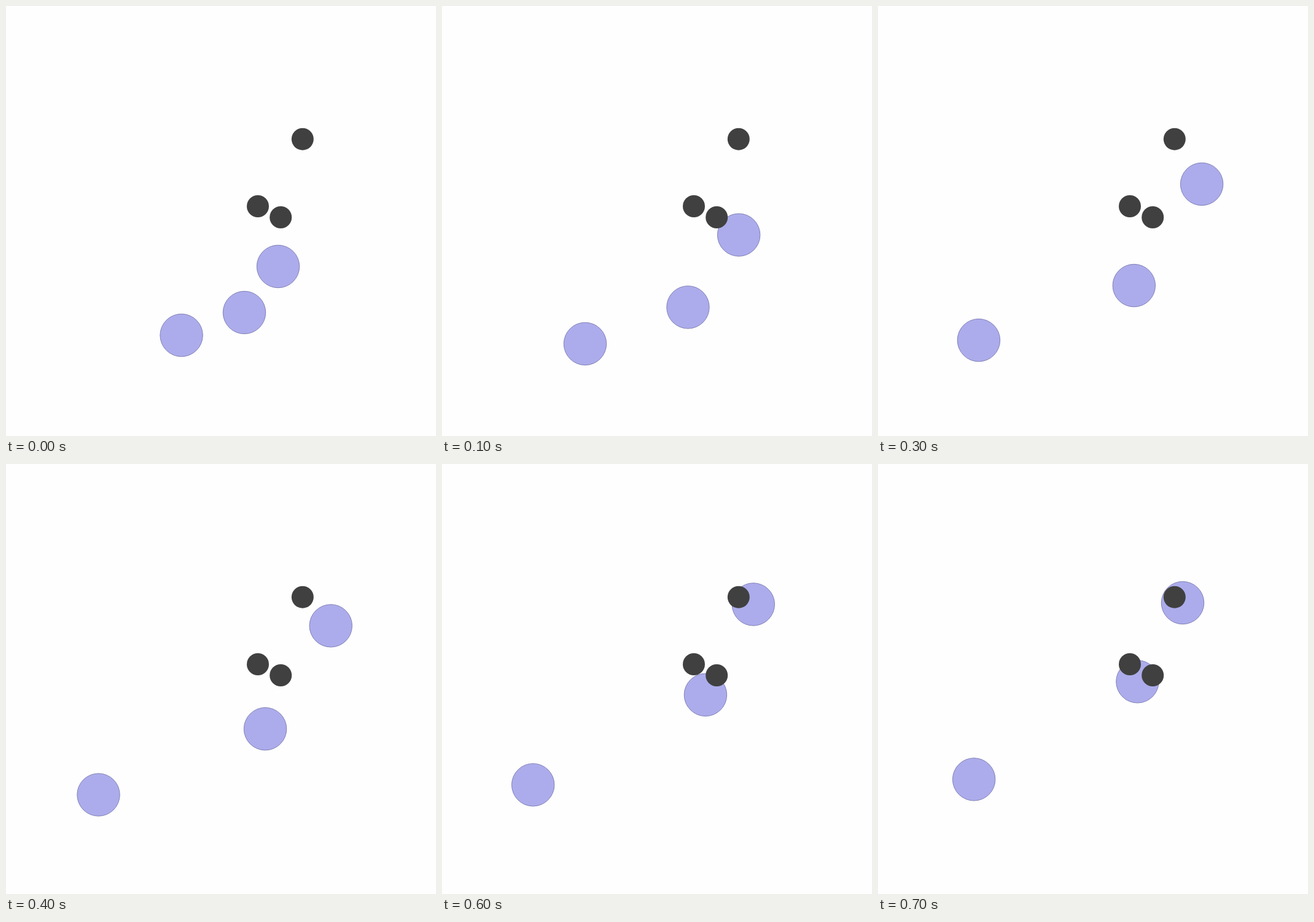
Recreate the animation shown at these times as an HTML page. Size 700 px wide and 700 px high, loop 800 ms.

```html
<!DOCTYPE html>
<html lang="en">
<head>
<meta charset="utf-8">
<title>Steered discs</title>
<style>
  html, body { margin: 0; width: 100%; height: 100%; overflow: hidden; background: #fefefe; }
  svg { display: block; width: 100%; height: 100%; }
  .disc { fill: #acacec; stroke: #8080b8; stroke-width: 1; }
  .dot { fill: #404040; }
</style>
</head>
<body>
<svg viewBox="0 0 700 700"></svg>
<script>
const STEP = 100;
const STEPS = 8;
const DAMPING = 0.75;
const PUSH = 8.75;
const PUSHES = { U: [0, -1], D: [0, 1], L: [-1, 0], R: [1, 0] };
const svg = document.querySelector('svg');

// Each disc coasts first, then gets one push per step
const movers = [
  { x: 443, y: 424, vx: 40.15, vy: -51.35, moves: 'ULLLLD' },
  { x: 388, y: 499, vx: 12.45, vy: -8.6, moves: 'UUUUUL' },
  { x: 285.6, y: 536, vx: -52.6, vy: 13.9, moves: 'UURRUR' }
];
const dots = [{ x: 482.8, y: 216.7 }, { x: 410, y: 326 }, { x: 447.2, y: 344 }];

function positionAt({ x, y, vx, vy, moves }, step) {
  for (let i = 0; i < step; i++) {
    x += vx;
    y += vy;
    const [px, py] = PUSHES[moves[i]] || [0, 0];
    vx = vx * DAMPING + px * PUSH;
    vy = vy * DAMPING + py * PUSH;
  }
  return { x, y };
}

function place(circle, { x, y }) {
  circle.setAttribute('cx', x);
  circle.setAttribute('cy', y);
}

function addCircle(type, r, point) {
  const circle = document.createElementNS('http://www.w3.org/2000/svg', 'circle');
  circle.setAttribute('class', type);
  circle.setAttribute('r', r);
  place(circle, point);
  svg.append(circle);
  return circle;
}

const discs = movers.map(mover => addCircle('disc', 34.7, mover));
dots.forEach(dot => addCircle('dot', 18, dot));

const start = performance.now();

function draw(now) {
  const step = Math.floor(Math.max(0, now - start) / STEP) % STEPS;
  discs.forEach((disc, i) => place(disc, positionAt(movers[i], step)));
  requestAnimationFrame(draw);
}

draw(start);
</script>
</body>
</html>
```
